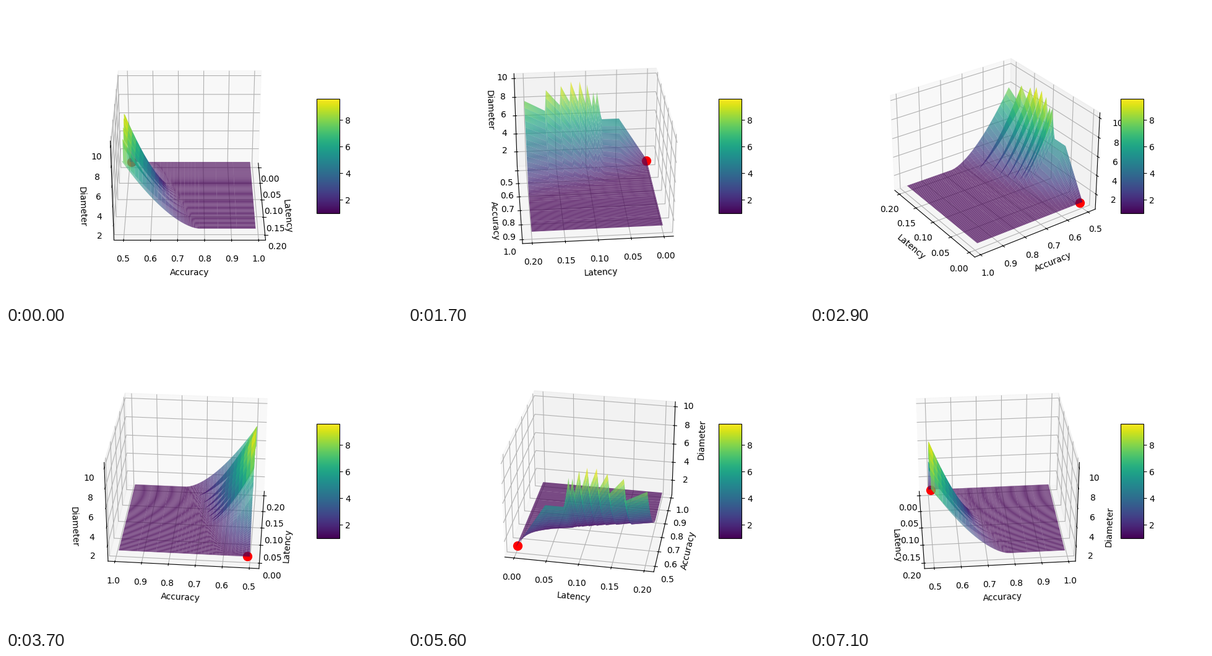
A matplotlib script for the animation above (7200 ms loop, 640x480 px).

```python
import numpy as np
import matplotlib.pyplot as plt
from matplotlib.animation import FuncAnimation
from matplotlib.cm import ScalarMappable
from matplotlib.colors import Normalize

FRAMES = 72
INTERVAL = 100
STEP = 360 / FRAMES


def ridge(latency):
    """Height above the floor at the lowest accuracy: teeth at latency 1/k."""
    k = np.floor(1 / latency + 1e-9)
    peak = np.minimum(65 * k ** -0.85, 8.9 - 260 * (1 / k - 0.115) ** 2)
    teeth = peak * (k * latency) ** (0.6 * k - 2)
    slope = np.minimum(100 * latency, 4.7)
    return np.where(k > 12, slope, teeth)


def diameter(latency, accuracy):
    """Ridge that fades to a flat floor of 1 as accuracy grows."""
    edge = 0.62 + 0.8 * latency
    fade = np.clip((edge - accuracy) / (edge - 0.5), 0, 1) ** 1.6
    return 1 + ridge(latency) * fade


# The floor is flat, so it needs only a few cells along accuracy.
latency = np.r_[1e-4, np.arange(0.001, 0.2, 0.002), 0.2]
accuracy = np.r_[np.arange(0.5, 0.775, 0.014), np.linspace(0.78, 0.99, 4)]
X, Y = np.meshgrid(latency, accuracy)
Z = diameter(X, Y)

norm = Normalize(1, 9.6)
fig = plt.figure(figsize=(6.4, 4.8), dpi=100)
ax = fig.add_subplot(projection="3d", computed_zorder=False)
ax.plot_surface(X, Y, Z, rstride=1, cstride=1, cmap="viridis", norm=norm,
                linewidth=0, antialiased=True, alpha=0.75, zorder=2)
ax.scatter([0.001], [0.51], [1], c="red", s=100, zorder=1)
ax.set_xlabel("Latency")
ax.set_ylabel("Accuracy")
ax.set_zlabel("Diameter")
fig.colorbar(ScalarMappable(norm, "viridis"), ax=ax, shrink=0.5, aspect=5)


def update(frame):
    ax.view_init(elev=30, azim=frame * STEP)
    return []


anim = FuncAnimation(fig, update, frames=FRAMES, interval=INTERVAL,
                     init_func=lambda: update(0), repeat=True, repeat_delay=0)
plt.show()
```
